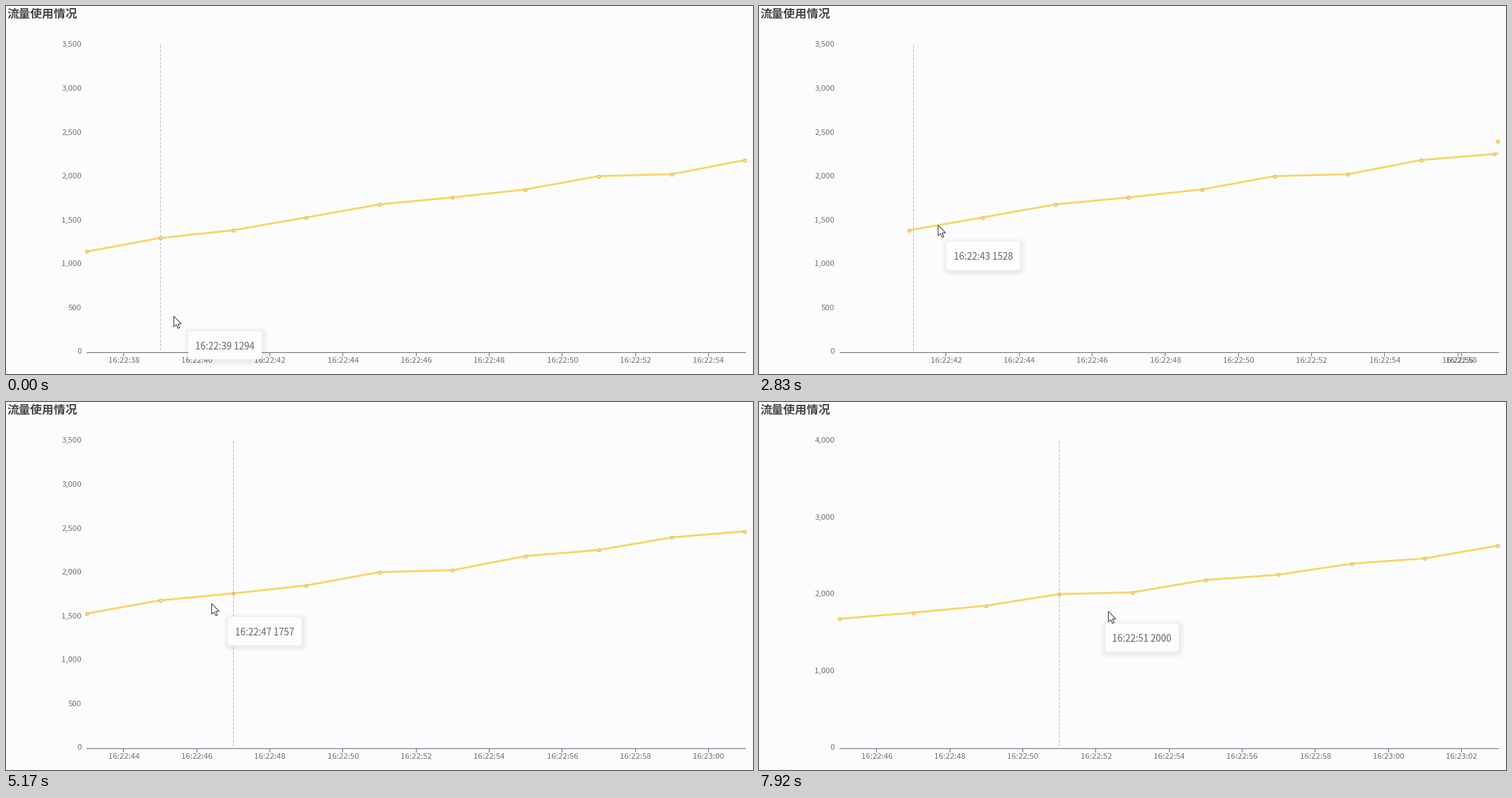
A matplotlib script that plays this animation: 1066 px wide and 525 px high, repeating every 8 s.

```python
import matplotlib.pyplot as plt
import numpy as np
from matplotlib.animation import FuncAnimation
from matplotlib.patches import FancyBboxPatch, Polygon, Rectangle

W, H, DPI = 1066, 525, 100
INTERVAL, LOOP = 40, 8000
PX = 72 / DPI                                # points per pixel

LEFT, RIGHT, TOP, BASE = 115.3, 1054.3, 55, 493
STEP = (RIGHT - LEFT) / 9                    # two seconds on the time axis
FONT = "Noto Sans CJK JP"
BG, GREY, AXIS, LINE, RING = "#fcfcfe", "#74746f", "#6e7079", "#f8d566", "#f0bc55"

# One reading every two seconds, starting at 16:22:37
FIRST = 37
VALUES = [1140, 1294, 1383, 1528, 1678, 1757, 1848, 2000, 2022, 2183,
          2252, 2396, 2465, 2630]
FIRST_UPDATE, PERIOD, UPDATE_MS = 686, 1997, 500
POINTER_MOVES, POINTER_MS = (2820, 6540), 200

# Mouse path as time, x, y; the tooltip trails behind it
MOUSE = np.array([
    (0, 239, 442), (840, 231, 398), (1040, 232, 382), (1800, 218, 322),
    (2000, 221, 321), (3080, 267, 309), (3280, 252, 302), (4960, 296, 285),
    (5160, 293, 287), (6800, 424, 288), (7000, 466, 292), (7720, 473, 294),
    (7920, 498, 298)])
TIP_LAG, TIP_OFFSET = 200, (21, 22)
ARROW = np.array([(0, 0), (0, 15.2), (3.5, 12), (6, 17.4), (8.2, 16.4),
                  (5.9, 11.2), (10.6, 11)])


def mouse(t):
    return np.array([np.interp(t, MOUSE[:, 0], MOUSE[:, i]) for i in (1, 2)])


def cubic_in_out(p):
    return 4 * p ** 3 if p < 0.5 else 1 - 4 * (1 - p) ** 3


def exp_out(p):
    return 1 if p >= 1 else 1 - 2 ** (-10 * p)


def clock(s):
    return f"16:{22 + s // 60}:{s % 60:02d}"


def axis_top(count):
    """Round the axis up to the next 500 with room for the newest readings."""
    return 4000 if VALUES[count + 9] > 2500 else 3500


def to_y(value, top):
    return BASE - np.asarray(value) * (BASE - TOP) / top


def mix(new, old, rest):
    return new * (1 - rest) + old * rest


fig = plt.figure(figsize=(W / DPI, H / DPI), dpi=DPI, facecolor=BG)
ax = fig.add_axes([0, 0, 1, 1])
ax.set_xlim(0, W)
ax.set_ylim(H, 0)
ax.axis("off")


def label(x, y, size, ha="left", **kw):
    kw = {"color": GREY, "zorder": 2, **kw}
    return ax.text(x, y, "", fontsize=size * PX, ha=ha, va="baseline",
                   family=FONT, **kw)


def rounded(width, height, radius, **kw):
    style = f"round,pad=0,rounding_size={radius}"
    return ax.add_patch(FancyBboxPatch((0, 0), width, height, boxstyle=style,
                                       ec="none", **kw))


title = label(2, 17, 16.7, color="#464646", weight="bold")
title.set_text("流量使用情况")

ax.plot([115, 1055], [493.5, 493.5], color=AXIS, lw=PX, zorder=1)
ticks = [ax.plot([0, 0], [493.5, 498.5], color=AXIS, lw=PX, zorder=1)[0]
         for _ in range(9)]
x_labels = [label(0, 509.3, 11.4, "center") for _ in range(9)]
y_labels = [label(108, 0, 11.4, "right") for _ in range(8)]

curve, = ax.plot([], [], color=LINE, lw=2.8 * PX, zorder=3,
                 solid_joinstyle="bevel", solid_capstyle="butt")
curve.set_clip_path(Rectangle((114, 50), 941, 446, transform=ax.transData))
rings, = ax.plot([], [], "o", ms=4 * PX, mfc="#fef9e8", mec=RING,
                 mew=1.7 * PX, zorder=4)
pointer, = ax.plot([0, 0], [TOP, BASE], color="#bdbdb6", lw=PX, zorder=5,
                   dashes=(4, 2), dash_capstyle="butt")

SPREAD = range(8, 0, -1)
shadows = [rounded(105 + 2 * s, 40 + 2 * s, 4 + s, fc="black", alpha=0.008,
                   zorder=6) for s in SPREAD]
card = rounded(105, 40, 4, fc="#fdfdff", zorder=7)
tip = label(0, 0, 13.4, color="#666666", zorder=8)
cursor = ax.add_patch(Polygon(ARROW, fc="white", ec="#3c3c44", lw=PX,
                              joinstyle="miter", zorder=9))


def draw_chart(count, rest):
    """rest is the part of the sliding update still to go, from 1 to 0."""
    top, old_top = axis_top(count), axis_top(max(count - 1, 0))
    values = VALUES[count:count + 10]
    x = LEFT + STEP * (np.arange(10) + rest)
    y = mix(to_y(values, top), to_y(values, old_top), rest)
    curve.set_data(x, y)
    # A new reading gets its ring in the final place at once
    x[-1], y[-1] = RIGHT, to_y(values[-1], top)
    rings.set_data(x, y)

    for i, (tick, text) in enumerate(zip(ticks, x_labels)):
        tx = LEFT + STEP * (i + 0.5 + (rest if i < 8 else 0))
        tick.set_xdata([tx, tx])
        text.set_x(tx + 0.5)
        text.set_text(clock(FIRST + 1 + 2 * (count + i)))

    step = 1000 if top == 4000 else 500
    for i, text in enumerate(y_labels):
        value = i * step
        text.set_visible(value <= top)
        ly = to_y(value, top)
        if value <= old_top:
            ly = mix(ly, to_y(value, old_top), rest)
        text.set_y(ly + 3.4)
        text.set_text(f"{value:,}")


def draw_tooltip(t, reading):
    x, y = mouse(t - TIP_LAG) + TIP_OFFSET
    card.set_x(x)
    card.set_y(y)
    for s, shade in zip(SPREAD, shadows):
        shade.set_x(x - s + 1)
        shade.set_y(y - s + 2)
    tip.set_position((x + 10, y + 26))
    tip.set_text(f"{clock(FIRST + 2 * reading)} {VALUES[reading]}")


def draw(frame):
    t = frame * INTERVAL
    count = max(0, (t - FIRST_UPDATE) // PERIOD + 1)
    since = t - FIRST_UPDATE - (count - 1) * PERIOD
    rest = 1 - cubic_in_out(min(since / UPDATE_MS, 1)) if count else 0
    draw_chart(count, rest)

    moves = [m for m in POINTER_MOVES if t >= m]
    place = 1 + sum(exp_out((t - m) / POINTER_MS) for m in moves)
    pointer.set_xdata([LEFT + STEP * place] * 2)

    draw_tooltip(t, count + 1 + len(moves))
    cursor.set_xy(ARROW + mouse(t) + 0.5)
    return []


anim = FuncAnimation(fig, draw, frames=LOOP // INTERVAL, interval=INTERVAL,
                     init_func=lambda: draw(0), repeat=True, repeat_delay=0)
plt.show()
```
